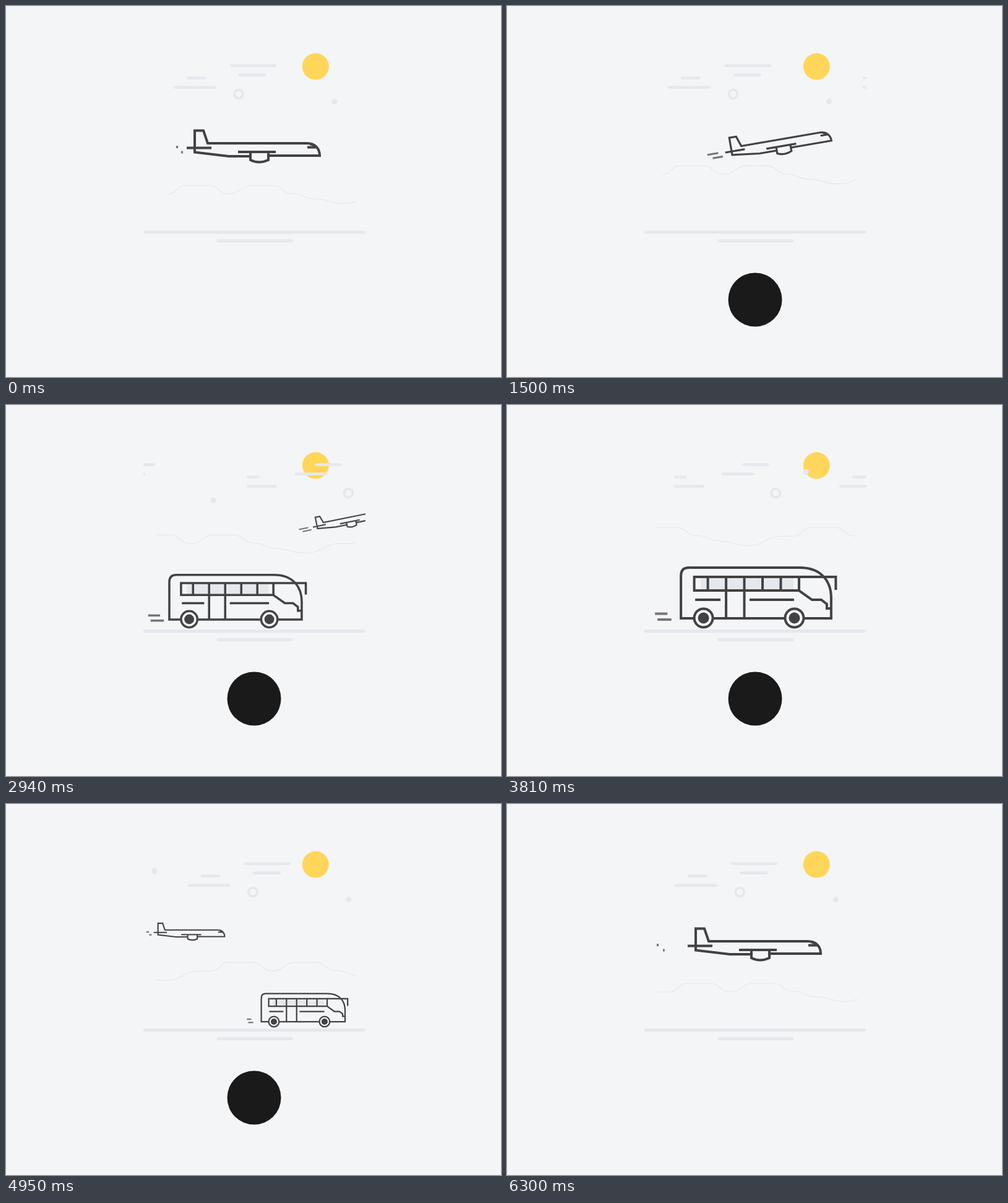
These frames come from a looping animation (800x600 px, 6.33 s). An HTML page with a canvas:

```html
<!DOCTYPE html>
<html lang="en">
<head>
<meta charset="utf-8">
<title>Plane and bus</title>
<style>
html, body { margin: 0; width: 100%; height: 100%; overflow: hidden; background: #f3f5f7; }
canvas { display: block; }
</style>
</head>
<body>
<canvas id="stage" width="800" height="600"></canvas>
<script>
const ctx = document.getElementById('stage').getContext('2d');
const LOOP = 6330, SKY_WIDTH = 581, HILL_WIDTH = 358, DRIFT = 44;
const PAPER = '#f3f5f7', INK = '#434143', SMOKE = '#777577', PALE = '#e6e8ee', FAINT = '#e5e8ec';

const planePath = new Path2D(`M395 243H360L305 236.5V201.500H319L326 222H486C500 222 507 231 507 242H424
  M292 229.500H332 M375 236H436 M395 236V249Q409 256 424 249V236 M502 228.500H487 M491 223Q498 224 502 229`);
const busPath = new Path2D(`M299 345H278V276Q278 263 291 263H470C505 263 521 285 521 312V345H478 M330 345H446
  M469 300H299.500V278H528.500V299 M351 300V345 M380.500 300V345
  M469 300L490 315H505L514 322V329H521 M301 315H342 M389 315H461`);

// Eases from 0 to 1 between start and start + length.
function glide(t, start, length) {
  const u = Math.min(1, Math.max(0, (t - start) / length));
  return u * u * (3 - 2 * u);
}

function line(x1, x2, y, width, color, cap = 'round') {
  ctx.beginPath();
  ctx.moveTo(x1, y);
  ctx.lineTo(x2, y);
  ctx.lineWidth = width;
  ctx.lineCap = cap;
  ctx.strokeStyle = color;
  ctx.stroke();
}

function circle(x, y, r, color, stroke) {
  ctx.beginPath();
  ctx.arc(x, y, r, 0, 2 * Math.PI);
  if (stroke) {
    ctx.lineWidth = stroke;
    ctx.strokeStyle = color;
    ctx.stroke();
  } else {
    ctx.fillStyle = color;
    ctx.fill();
  }
}

function outline(path) {
  ctx.lineWidth = 4;
  ctx.lineCap = 'butt';
  ctx.strokeStyle = INK;
  ctx.stroke(path);
}

function clipped(left, right, draw) {
  ctx.save();
  ctx.beginPath();
  ctx.rect(left, 60, right - left, 320);
  ctx.clip();
  draw();
  ctx.restore();
}

// Draws one tile and the copy that follows it.
function tiled(x, y, width, draw) {
  for (const shift of [x, x + width]) {
    ctx.save();
    ctx.translate(shift, y);
    draw();
    ctx.restore();
  }
}

function sky() {
  const streaks = [[362, 437, 96], [376, 421, 111], [292, 323, 116], [271, 339, 131],
    [695, 738, 96], [662, 715, 111], [585, 605, 116], [585, 633, 131]];
  for (const [a, b, y] of streaks) line(a + 2, b - 2, y + .5, 4.5, PALE);
  for (const x of [376, 749]) circle(x, 142.5, 7, PALE, 4);
  circle(531, 154.5, 4.7, PALE);
  circle(798, 108.5, 4.7, PALE);
}

function hills() {
  const bends = [[262, 304], [290, 290], [328, 290], [360, 304], [398, 290], [430, 290],
    [462, 303], [500, 312], [545, 319.5], [603, 304], [620, 304]];
  ctx.beginPath();
  let [px, py] = bends[0];
  for (const [x, y] of bends) {
    const mid = (px + x) / 2;
    ctx.bezierCurveTo(mid, py, mid, y, x, y);
    [px, py] = [x, y];
  }
  ctx.lineWidth = 1.2;
  ctx.strokeStyle = FAINT;
  ctx.stroke();
}

// A dash grows from its right end to the left, then shrinks away.
function puff(left, right, y, cycles) {
  const phase = cycles - Math.floor(cycles), span = right - left;
  const head = Math.min(1, phase * 2), tail = Math.max(0, phase * 2 - 1);
  line(right - span * head, right - span * tail, y, 4, SMOKE, 'butt');
}

function plane(t) {
  outline(planePath);
  const cycles = 18 * t / LOOP + .04;
  puff(242, 278, 228, cycles);
  puff(252, 286, 236.5, cycles);
}

function bus(t) {
  ctx.fillStyle = FAINT;
  ctx.fillRect(310, 280, 150, 18);
  ctx.fillStyle = INK;
  for (let x = 321.5; x < 480; x += 29.5) ctx.fillRect(x - 2, 278, 4, 22);
  outline(busPath);
  for (const x of [314.5, 461.5]) {
    circle(x, 344.5, 15, PAPER);
    circle(x, 344.5, 15, INK, 4);
    circle(x, 344.5, 9, INK);
  }
  const cycles = 23 * t / LOOP - .25;
  puff(236, 261, 337.5, cycles);
  puff(240, 268, 347, cycles);
}

// Progress is below 0 on the way in, 0 at the centre, above 0 on the way out.
const offset = p => 37 * p + Math.sign(p) * Math.abs(p) ** 6.5;
const size = d => .53 + .47 * Math.exp(-((Math.abs(d) / 50) ** 2.2));

function ride(p, pivotY, lift, tilt, draw) {
  const d = offset(p), scale = size(d);
  ctx.save();
  ctx.translate(400 + d, pivotY - lift);
  ctx.rotate(tilt);
  ctx.scale(scale, scale);
  ctx.translate(-400, -pivotY);
  draw();
  ctx.restore();
}

function ridePlane(t) {
  const p = t < LOOP / 2 ? t / 1500 : Math.min(0, (t - 6285) / 760);
  const lift = (p > 0 ? 7 : 4.7) * Math.abs(p) ** 2.7;
  const tilt = p > 0 ? -.2 * (1 - Math.exp(-offset(p) / 20)) : 0;
  ride(p, 229, lift, tilt, () => plane(t));
}

function rideBus(t) {
  const p = Math.min(0, (t - 3525) / 760) + Math.max(0, (t - 3750) / 750);
  ride(p, 361.3, 0, 0, () => bus(t));
}

function frame(now) {
  const t = now % LOOP, drift = DRIFT * t / LOOP;
  const skyX = drift + (SKY_WIDTH - DRIFT) / 2 * (glide(t, 2380, 930) + glide(t, 3540, 1630));
  const hillX = drift + (HILL_WIDTH - DRIFT) * glide(t, 2000, 4100);
  const hillY = 92 * (glide(t, 0, 3810) - glide(t, 3810, 1940));
  const badge = glide(t, 250, 650) - glide(t, 6000, 250);

  ctx.fillStyle = PAPER;
  ctx.fillRect(0, 0, 800, 600);
  circle(500.3, 97.8, 21.5, '#ffd65a');
  clipped(243, 566, () => tiled(-hillX, -hillY, HILL_WIDTH, hills));
  clipped(222, 581, () => {
    tiled(-skyX, 0, SKY_WIDTH, sky);
    line(224, 578, 365.7, 5, PALE);
    ridePlane(t);
    rideBus(t);
  });
  line(343, 461, 379.7, 5, PALE);
  circle(401, 475, 43.5 * badge, '#1a1a1a');
  requestAnimationFrame(() => frame(performance.now() - start));
}

const start = performance.now();
frame(0);
</script>
</body>
</html>
```
